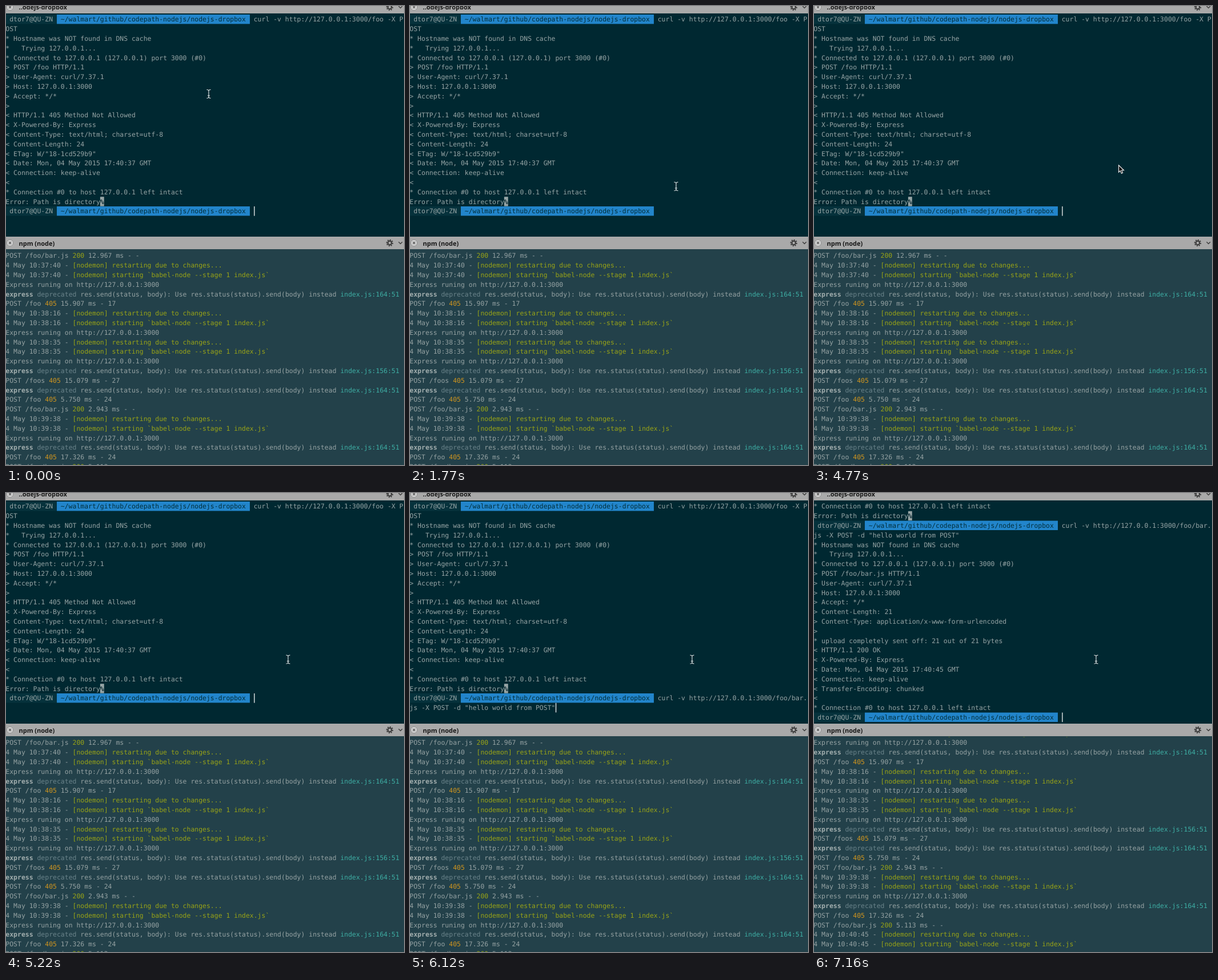
An HTML page that plays this animation: 697x804 px, repeating every 8 s.

```html
<!DOCTYPE html>
<html lang="en">
<head>
<meta charset="utf-8">
<title>Terminal</title>
<style>
  html, body { margin: 0; width: 100%; height: 100%; overflow: hidden; background: #002831; }
  svg { display: block; }
  text { white-space: pre; text-rendering: geometricPrecision; }
  .row { font: 11.46px "DejaVu Sans Mono", "Liberation Mono", monospace; }
  .title { font: bold 11px "Open Sans", "Noto Sans", sans-serif; fill: #161616; }
  .top { fill: #96a4a5; }
  .log { fill: #95a2a3; }
  .path { fill: #022f3b; }
  .inv { fill: #0a2a32; font-weight: bold; }
  .green { fill: #98a317; }
  .orange { fill: #d0951f; }
  .cyan { fill: #3eaea4; }
  .bold { fill: #a3afaf; font-weight: bold; }
  .dim { fill: #6a838a; }
</style>
</head>
<body>
<svg id="stage" width="100%" height="100%" viewBox="0 0 697 804">
  <defs>
    <g id="bar">
      <rect width="697" height="22" fill="#a9a9a9"/>
      <circle cx="7" cy="11" r="5.6" fill="#d2d2d2" stroke="#858585" stroke-width=".8"/>
      <path d="M5 9l4 4m0-4l-4 4" stroke="#555" stroke-width="1.2"/>
      <g fill="none" stroke="#3d3d3d">
        <circle cx="672" cy="11" r="3.3" stroke-width="2.2"/>
        <circle cx="672" cy="11" r="5.2" stroke-width="2" pathLength="16" stroke-dasharray="1"/>
        <path d="M687.5 9.3l3.3 3.3l3.3-3.3" stroke-width="1.4"/>
      </g>
    </g>
  </defs>
  <rect width="697" height="804" fill="#002831"/>
  <svg y="13" width="697" height="391"><g id="shell"></g></svg>
  <rect y="426" width="697" height="378" fill="#23414a"/>
  <svg y="427" width="697" height="377"><g id="log"></g></svg>
  <use href="#bar" y="-9"/>
  <text id="title" class="title" x="22.5" y="6.3"></text>
  <use href="#bar" y="404"/>
  <text class="title" x="22.5" y="419.6">npm (node)</text>
  <rect id="caret" width="1.4" height="16.6" fill="#e4e8e8"/>
  <g id="beam" fill="none" stroke="#e8ecec" stroke-width="1.1">
    <path d="M-3.5-7.5Q0-7.5 0-5Q0-7.5 3.5-7.5M0-5V5M-3.5 7.5Q0 7.5 0 5Q0 7.5 3.5 7.5M-2 3H2"/>
  </g>
  <path id="arrow" d="M.6.8V13.2L3.4 10.6L5.4 15.2L7.6 14.2L5.7 9.8H9.6Z" fill="#111" stroke="#f4f4f4" stroke-width="1.1"/>
  <g id="hand" fill="#f6f6f6" stroke="#111" stroke-width=".8" stroke-linejoin="round">
    <path d="M4 9.5L1.2 3Q.9 1.2 2.3 1.1Q3.3 1.1 3.9 2.6L5.4 6.2Q6.4 4.8 7.6 6Q8.8 4.9 9.8 6.2Q11.2 5.4 12.1 7.2Q13.4 10 12.2 12.3L11.8 15H5.6Q4.3 13 1.4 10.3Q.2 8.9 1.2 8.4Q2.4 8 4 9.5Z"/>
    <path d="M7 10v3m2-3v3m2-3v3" stroke-width=".6"/>
  </g>
</svg>
<script>
const LOOP = 8000, COL = 6.899, ROW = 16.8, LEFT = -0.7;
const $ = id => document.getElementById(id);

function add(parent, tag, attrs, text) {
  const el = document.createElementNS("http://www.w3.org/2000/svg", tag);
  for (const k in attrs) el.setAttribute(k, attrs[k]);
  if (text) el.textContent = text;
  return parent.appendChild(el);
}

// A row is a string or a list of [class, text] runs.
const toRuns = row => typeof row === "string" ? [["", row]] : row;

// Fills drawn behind runs of a class
const fills = { user: "#06323c", path: "#2285cb", inv: "#96a4a5" };

function addRow(parent, cls, row, i) {
  const g = add(parent, "g", {}), runs = toRuns(row);
  let x = LEFT;
  for (const [c, s] of runs) {
    const width = s.length * COL;
    if (fills[c]) add(g, "rect", { x, y: 2 + i * ROW, width, height: ROW - 0.4, fill: fills[c] });
    x += width;
  }
  const text = add(g, "text", { class: "row " + cls, x: LEFT, y: 14.4 + i * ROW });
  for (const [c, s] of runs) add(text, "tspan", c ? { class: c } : {}, s);
  return g;
}

const prompt = cmd => [
  ["user", " dtor7@QU-ZN "],
  ["path", " ~/walmart/github/codepath-nodejs/nodejs-dropbox "],
  ["typed", " " + cmd]
];

const shellRows = [
  prompt("curl -v http://127.0.0.1:3000/foo -X P"),
  "OST",
  "* Hostname was NOT found in DNS cache",
  "*   Trying 127.0.0.1...",
  "* Connected to 127.0.0.1 (127.0.0.1) port 3000 (#0)",
  "> POST /foo HTTP/1.1",
  "> User-Agent: curl/7.37.1",
  "> Host: 127.0.0.1:3000",
  "> Accept: */*",
  ">",
  "< HTTP/1.1 405 Method Not Allowed",
  "< X-Powered-By: Express",
  "< Content-Type: text/html; charset=utf-8",
  "< Content-Length: 24",
  "< ETag: W/\"18-1cd529b9\"",
  "< Date: Mon, 04 May 2015 17:40:37 GMT",
  "< Connection: keep-alive",
  "<",
  "* Connection #0 to host 127.0.0.1 left intact",
  [["", "Error: Path is directory"], ["inv", "%"]],
  prompt("curl -v http://127.0.0.1:3000/foo/bar."),
  "js -X POST -d \"hello world from POST\"",
  "* Hostname was NOT found in DNS cache",
  "*   Trying 127.0.0.1...",
  "* Connected to 127.0.0.1 (127.0.0.1) port 3000 (#0)",
  "> POST /foo/bar.js HTTP/1.1",
  "> User-Agent: curl/7.37.1",
  "> Host: 127.0.0.1:3000",
  "> Accept: */*",
  "> Content-Length: 21",
  "> Content-Type: application/x-www-form-urlencoded",
  ">",
  "* upload completely sent off: 21 out of 21 bytes",
  "< HTTP/1.1 200 OK",
  "< X-Powered-By: Express",
  "< Date: Mon, 04 May 2015 17:40:45 GMT",
  "< Connection: keep-alive",
  "< Transfer-Encoding: chunked",
  "<",
  "* Connection #0 to host 127.0.0.1 left intact",
  prompt("")
];

const post = (path, code, rest) =>
  [["", `POST ${path} `], [code === 200 ? "green" : "orange", String(code)], ["", " " + rest]];
const nodemon = (time, msg) => [["", `4 May ${time} - `], ["green", "[nodemon] " + msg]];
const restart = time => [
  nodemon(time, "restarting due to changes..."),
  nodemon(time, "starting `babel-node --stage 1 index.js`")
];
const running = "Express runing on http://127.0.0.1:3000";
const warn = line => [
  ["bold", "express"], ["dim", " deprecated"],
  ["", " res.send(status, body): Use res.status(status).send(body) instead "],
  ["cyan", `index.js:${line}:51`]
];

const logRows = [
  post("/foo/bar.js", 200, "12.967 ms - -"),
  ...restart("10:37:40"), running,
  warn(164), post("/foo", 405, "15.907 ms - 17"),
  ...restart("10:38:16"), running,
  ...restart("10:38:35"), running,
  warn(156), post("/foos", 405, "15.079 ms - 27"),
  warn(164), post("/foo", 405, "5.750 ms - 24"),
  post("/foo/bar.js", 200, "2.943 ms - -"),
  ...restart("10:39:38"), running,
  warn(164), post("/foo", 405, "17.326 ms - 24"),
  post("/foo/bar.js", 200, "5.113 ms - -"),
  ...restart("10:40:45")
];

const CMD = 20, SCROLL = 18, LOG_SCROLL = 3;
const rowEls = shellRows.map((row, i) => addRow($("shell"), "top", row, i));
logRows.forEach((row, i) => addRow($("log"), "log", row, i));
const typed = rowEls[CMD].querySelector(".typed");

// Pointer: time, shape, x, y
const pointer = [
  [0, "beam", 355, 154], [1040, "beam", 346, 224], [1190, "beam", 235, 299],
  [1340, "beam", 136, 325], [1480, "beam", 124, 349], [1630, "beam", 53, 346],
  [1770, "beam", 466, 316], [1920, ""], [4770, "arrow", 533, 278],
  [4920, "arrow", 494, 291], [5070, "arrow", 494, 286], [5220, "beam", 494, 291.5],
  [5820, "hand", 490.5, 288.5], [6120, "beam", 494, 291.5]
];
// Caret: time, column (-1 hides it), row
const caret = [
  [0, 63, 20], [1770, -1, 20], [2670, 63, 20], [5370, -1, 20], [6120, 37, 21], [7160, 63, 22]
];
const at = (keys, t) => keys.filter(k => k[0] <= t).pop();
const show = (el, on) => el.setAttribute("visibility", on ? "visible" : "hidden");
const scroll = (id, rows) => $(id).setAttribute("transform", `translate(0 ${-rows * ROW})`);

function draw(t) {
  const entered = t >= 6120, done = t >= 7160;
  show(typed, entered);
  rowEls.forEach((el, i) => { if (i > CMD) show(el, i === CMD + 1 ? entered : done); });
  scroll("shell", done ? SCROLL : 0);
  scroll("log", done ? LOG_SCROLL : 0);
  $("title").textContent = t >= 7020 && !done ? "curl" : "..odejs-dropbox";

  const [, col, row] = at(caret, t);
  show($("caret"), col >= 0);
  $("caret").setAttribute("x", LEFT + col * COL + 0.3);
  $("caret").setAttribute("y", 15 + row * ROW);

  const [, shape, x, y] = at(pointer, t);
  for (const id of ["beam", "arrow", "hand"]) show($(id), id === shape);
  if (shape) $(shape).setAttribute("transform", `translate(${x} ${y})`);
}

const start = performance.now();
function tick() {
  draw((performance.now() - start) % LOOP);
  requestAnimationFrame(tick);
}
tick();
</script>
</body>
</html>
```
